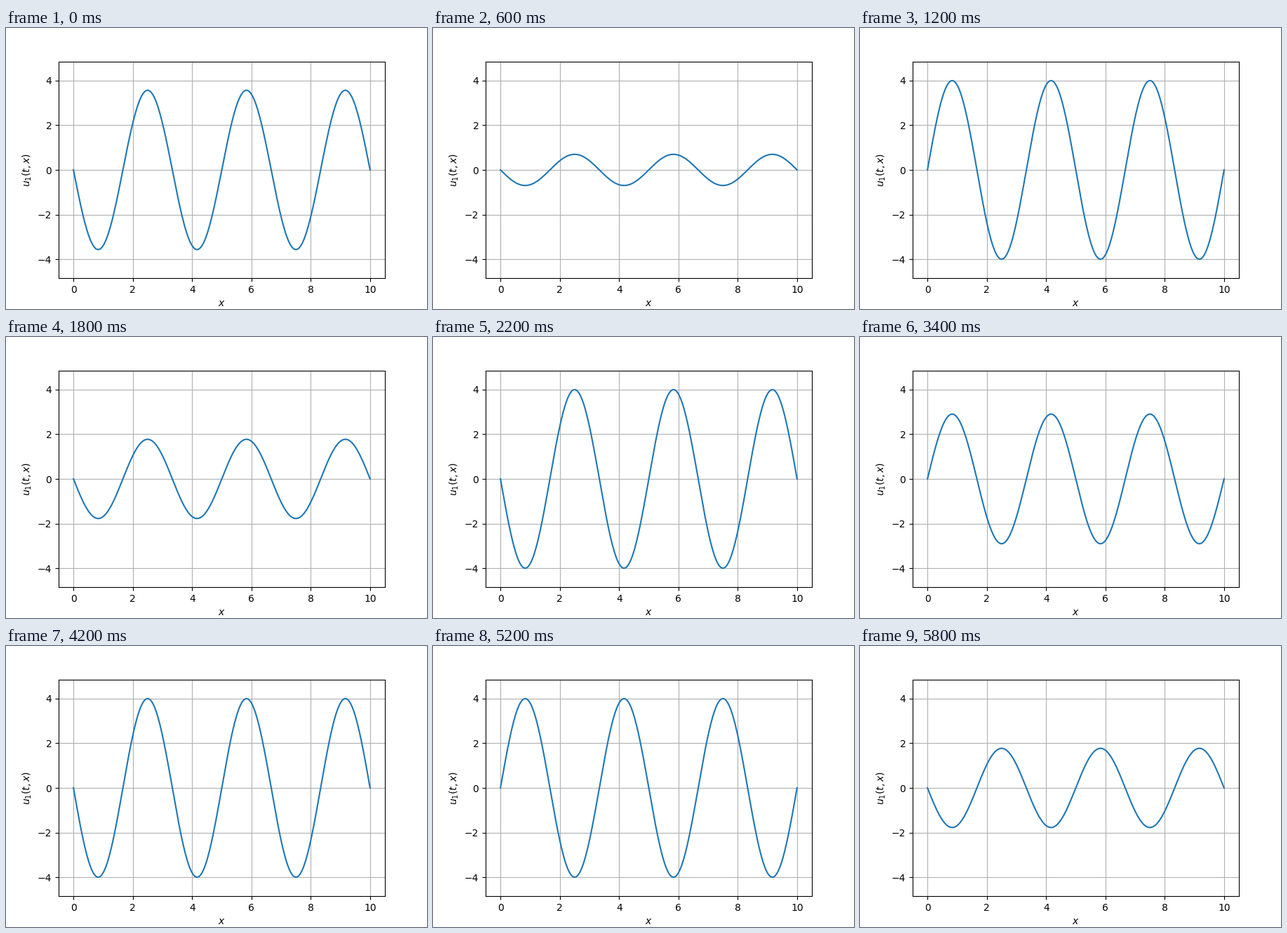
A matplotlib script for the animation above (6 s loop, 600 by 400 pixels).

```python
import numpy as np
import matplotlib.pyplot as plt
from matplotlib.animation import FuncAnimation

FRAMES = 30
INTERVAL = 200      # ms
LENGTH = 10
AMPLITUDE = 4.04
PHASE = np.radians(152.05)
K = 6 * np.pi / LENGTH      # three full waves between the fixed ends
DT = LENGTH / FRAMES        # wave speed is 1

x = np.linspace(0, LENGTH, 500)
mode = np.sin(K * x)


def wave(t):
    return AMPLITUDE * np.cos(K * t + PHASE) * mode


fig, ax = plt.subplots(figsize=(6, 4), dpi=100)
line, = ax.plot(x, wave(0))
ax.set_ylim(-1.2 * AMPLITUDE, 1.2 * AMPLITUDE)
ax.set_xlabel("$x$")
ax.set_ylabel("$u_1(t, x)$")
ax.grid(True)


def update(i):
    line.set_ydata(wave(i * DT))
    return line,


anim = FuncAnimation(fig, update, frames=FRAMES, interval=INTERVAL,
                     repeat=True, repeat_delay=0)
plt.show()
```
